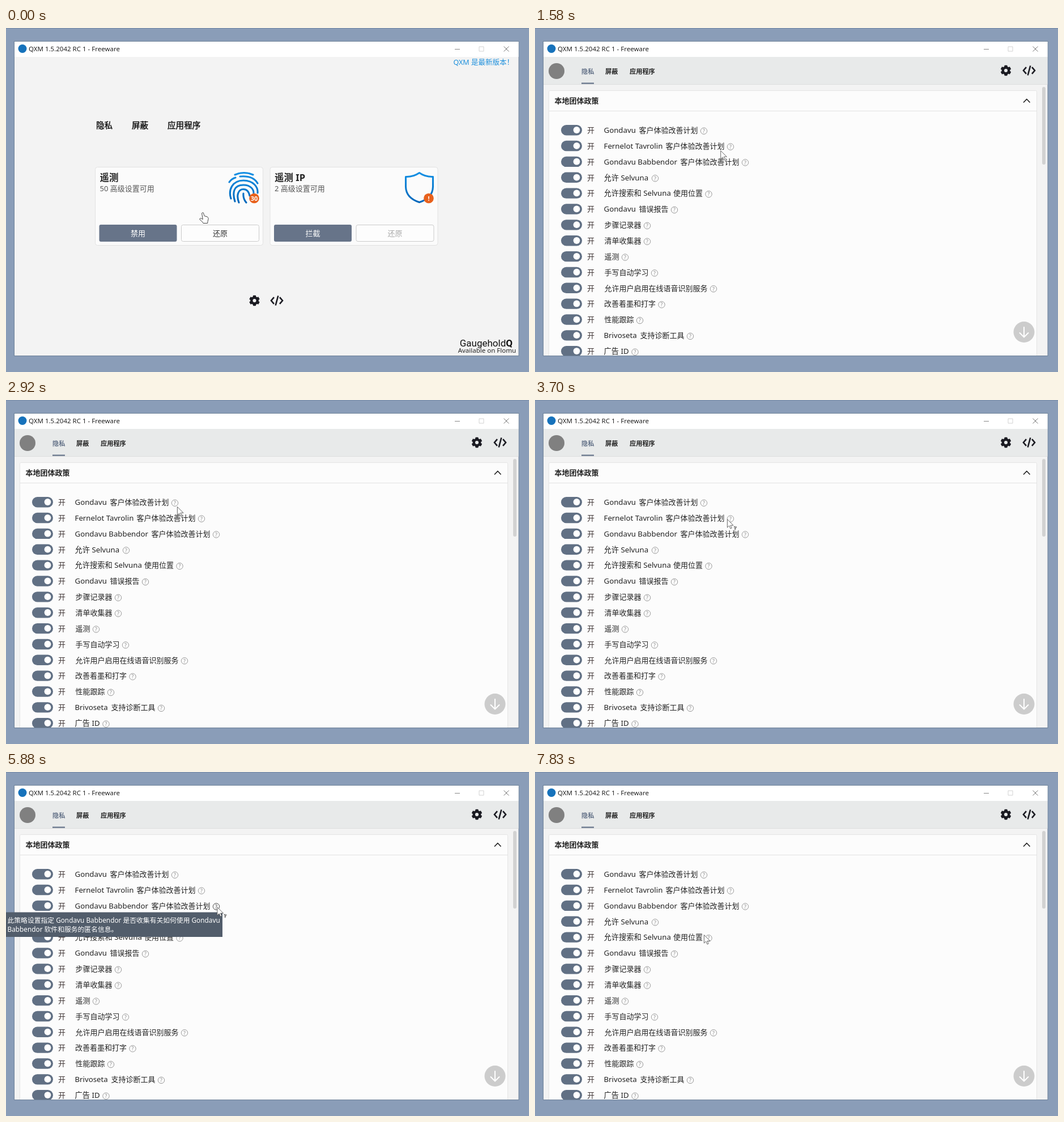
Recreate the animation shown at these times as an HTML page. Size 923 px wide and 607 px high, loop 7990 ms.

```html
<!DOCTYPE html>
<html lang="zh-CN">
<head>
<meta charset="utf-8">
<title>Privacy settings</title>
<style>
  html, body { margin: 0; width: 100%; height: 100%; overflow: hidden; background: #8a9db8; }
  svg { display: block; width: 100%; height: 100%; }
  text { font-family: 'Noto Sans', 'Noto Sans CJK SC', sans-serif; fill: #222; white-space: pre; }
  .mid { text-anchor: middle; }
  .end { text-anchor: end; }
  .bold { font-weight: 700; }
  .light { font-weight: 300; }
  .semi { stroke: #111; stroke-width: .4; }
  .brand { font-family: Roboto, sans-serif; }
  .line { fill: none; stroke-linecap: round; stroke-linejoin: round; }
  .help { stroke: #999; fill: none; }
  .help text { fill: #888; stroke: none; font-size: 9px; }
  .help.hover { stroke: #444; }
  .help.hover text { fill: #333; }
  .tip rect { fill: #525d6b; }
  .tip text { fill: #fff; }
</style>
</head>
<body>
<svg viewBox="0 0 923 607">
  <defs>
    <clipPath id="inside"><path d="M15 24H904.5V578H15Z"/></clipPath>
    <linearGradient id="blue" x2="0" y2="1">
      <stop stop-color="#1590e4"/><stop offset="1" stop-color="#0067bb"/>
    </linearGradient>
    <g id="gear">
      <circle r="5.2" fill="none" stroke="#1b1b22" stroke-width="4.4"/>
      <g id="teeth" fill="#1b1b22"></g>
    </g>
    <path id="code" fill="none" stroke="#1b1b22" stroke-width="2.6" d="M-5 -5.800L-10 0L-5 5.800M5 -5.800L10 0L5 5.800M2.300 -8.500L-2.300 8.500"/>
    <path id="arrowShape" fill="#fff" stroke="#555" stroke-width=".9" d="M.4 .5V15L3.7 11.8 6 17 8.2 16 6 11.2H11Z"/>
    <g id="arrow"><use href="#arrowShape"/></g>
    <g id="helper">
      <use href="#arrowShape"/>
      <text x="14.5" y="18.500" class="mid bold" font-size="9.500" style="fill:#fff;stroke:#555;stroke-width:.7">?</text>
    </g>
    <path id="hand" fill="#fff" stroke="#444" stroke-linejoin="round"
      d="M4.6 2Q5.6 -.3 7.4 1.2L9 6.6L14 8Q16 9 16.2 11.5L15 16.5L14.6 19.5H7L6 17.5L1 13Q.5 10.6 2.6 10.6L6.3 12.6Z"/>
  </defs>

  <rect width="923" height="607" fill="#8a9db8"/>
  <rect width="923" height="1" fill="#7489a5"/>
  <rect x="14.5" y="23.5" width="890.5" height="555" fill="#f3f3f3" stroke="#6d8198"/>
  <rect x="15" y="24" width="889.5" height="27" fill="#fff"/>
  <circle cx="29" cy="36.5" r="7.5" fill="#1672bb"/>
  <text x="40" y="41" font-size="11.5">QXM 1.5.2042 RC 1 - Freeware</text>
  <path d="M792 37.5H801" stroke="#888"/>
  <path d="M835 33H843V41H835Z" fill="none" stroke="#d2d2d2"/>
  <path d="M878.5 32.5L887.5 41.5M887.5 32.5L878.5 41.5" stroke="#777"/>

  <g id="home"></g>
  <g id="list" clip-path="url(#inside)"></g>
  <g id="overlay">
    <circle id="click" cx="297" cy="186.5" r="10.5" fill="#fbe72a" style="mix-blend-mode:multiply"/>
  </g>
  <use id="cursor"/>
</svg>
<script>
const LOOP = 7990;
const $ = id => document.getElementById(id);
const text = (x, y, size, str, cls = '', fill = '') =>
  `<text x="${x}" y="${y}" font-size="${size}" class="${cls}"${fill && ` style="fill:${fill}"`}>${str}</text>`;
const box = (x, y, w, h, r, fill, stroke = 'none') =>
  `<rect x="${x}" y="${y}" width="${w}" height="${h}" rx="${r}" fill="${fill}" stroke="${stroke}"/>`;
const place = (id, x, y) => `<use href="#${id}" x="${x}" y="${y}"/>`;

$('teeth').innerHTML = [0, 60, 120, 180, 240, 300]
  .map(a => `<rect x="-2.6" y="-9.3" width="5.2" height="4" rx=".8" transform="rotate(${a})"/>`).join('');

// Start page
const card = (x, title, note, action, restoreColor, icon, badge, badgeX) =>
  box(x + .5, 245.5, 296, 138, 4, '#fbfbfb', '#e2e2e2') +
  text(x + 8.5, 270, 16.5, title, 'bold') +
  text(x + 8.5, 288, 13, note, 'light', '#555') +
  box(x + 7.5, 347, 137, 30, 3, '#677489') +
  text(x + 76, 367, 13, action, 'mid', '#fff') +
  box(x + 152.5, 347.5, 137, 29, 3, '#fdfdfd', '#cbcbcb') +
  text(x + 221, 367, 13, '还原', 'mid', restoreColor) +
  `<path class="line" stroke="url(#blue)" stroke-width="3.1" d="${icon}"/>` +
  `<circle cx="${badgeX}" cy="300.5" r="8.8" fill="#e8611c"/>` +
  text(badgeX, 304.5, 11, badge, 'mid bold', '#fff');

const fingerprint = 'M404 259Q420 252 436 259M394 272Q398 266 405 264M413 262Q436 260 444 274' +
  'M397 301C392 286 399 269 419 269C437 269 445 281 444 291' +
  'M404 306C399 290 402 277 419 277C432 277 437 285 437 291' +
  'M411 308C406 295 410 284.5 419 284.5C427 284.5 429 291 430 296M419 292Q418 301 424 308';
const shield = 'M729.5 255.5Q740 263 753.5 262.5V280Q753 300 729.5 307.5' +
  'Q706 300 705.5 280V262.5Q719 263 729.5 255.5Z';

$('home').innerHTML =
  text(789.5, 65, 12.5, 'QXM 是最新版本！', 'light', '#1c8fdc') +
  [[159, '隐私'], [222, '屏蔽'], [285, '应用程序']]
    .map(([x, s]) => text(x, 177, 14.6, s, 'semi', '#111')).join('') +
  card(157, '遥测', '50 高级设置可用', '禁用', '#333', fingerprint, '30', 438) +
  card(465.5, '遥测 IP', '2 高级设置可用', '拦截', '#aaa', shield, '!', 746) +
  place('gear', 438.5, 481) + place('code', 478, 481) +
  text(894, 562, 17, 'Gaugehold<tspan class="bold">Q</tspan>', 'end brand', '#111') +
  text(900, 573, 11.5, 'Available on Flomu', 'end');

// Policy list: head, tail, centre of the help mark
const rows = [
  ['Gondavu', '客户体验改善计划', 298], ['Fernelot Tavrolin', '客户体验改善计划', 345],
  ['Gondavu Babbendor', '客户体验改善计划', 371], ['允许 Selvuna', '', 212],
  ['允许搜索和 Selvuna', '使用位置', 306.5], ['Gondavu', '错误报告', 246],
  ['', '步骤记录器', 198], ['', '清单收集器', 198], ['', '遥测', 159], ['', '手写自动学习', 211],
  ['', '允许用户启用在线语音识别服务', 315], ['', '改善着墨和打字', 223.5],
  ['', '性能跟踪', 185], ['Brivoseta', '支持诊断工具', 274], ['广告 ID', '', 176.5]
];
const row = ([head, tail, markX], i) => {
  const y = 180 + i * 27.86;
  return box(46, y - 9, 37, 18.4, 9.2, '#617084') +
    `<circle cx="73.5" cy="${y}" r="5.9" fill="#fff"/>` +
    text(92, y + 5, 13, '开', 'light', '#3c3232') +
    text(121.5, y + 5, 13.25, head) + text(markX - 10.5, y + 5, 13, tail, 'end light') +
    `<g class="help"><circle cx="${markX}" cy="${y + 1.7}" r="5.7"/>${text(markX, y + 5, 9, '?', 'mid')}</g>`;
};

$('list').innerHTML =
  box(15, 51, 890, 48, 0, '#e8eaea') + box(15, 99, 890, 1, 0, '#dcdddd') +
  '<circle cx="38" cy="76" r="14" fill="#808080"/>' +
  text(82, 81, 11.2, '隐私', 'bold', '#66748a') +
  text(124, 81, 11.2, '屏蔽', 'bold') + text(167, 81, 11.2, '应用程序', 'bold') +
  '<rect id="underline" y="96.5" height="2.2" fill="#66748a"/>' +
  place('gear', 831, 75) + place('code', 872, 75) +
  box(24.5, 110.5, 861, 480, 2, '#fcfcfc', '#e4e4e4') + box(25, 146, 861, 1, 0, '#e2e2e2') +
  text(34.5, 133, 13, '本地团体政策', 'bold') +
  '<path class="line" stroke="#222" stroke-width="1.7" d="M862.5 131L867.8 125.5L873 131"/>' +
  box(895, 104, 6, 137, 3, '#d2d2d2') +
  rows.map(row).join('') +
  '<circle cx="863" cy="536.5" r="18.5" fill="#ccc"/>' +
  '<path class="line" stroke="#fff" stroke-width="2" d="M863 528V545M855.5 538L863 545.5L870.5 538"/>';

const marks = [...document.querySelectorAll('.help')];

// Tooltips: the bar opens at `open`, unfolds at `full`
const tips = [
  { hover: 1860, open: 2270, full: 2390, close: 2920, x: 0, y: 198, w: 308, bar: 10,
    lines: ['此策略设置可关闭 Gondavu 客户体验改善计划。', '该计划收集有关硬件配置以及如何使用软件和服务的信', '息，以识别趋势和使用模式。'] },
  { hover: 3860, open: 3990, full: 4120, close: 4770, x: 163, y: 222, w: 190, bar: 8,
    lines: ['此策略设置可阻止用户参与该计划'] },
  { hover: 5310, open: 5720, full: 5880, close: 7180, x: 0, y: 247.5, w: 382, bar: 6,
    lines: ['此策略设置指定 Gondavu Babbendor 是否收集有关如何使用 Gondavu', 'Babbendor 软件和服务的匿名信息。'] }
];
$('overlay').insertAdjacentHTML('beforeend', tips.map(t =>
  `<g class="tip"><rect x="${t.x}" y="${t.y}" width="${t.w}"/><g>` +
  t.lines.map((s, i) => text(t.x + 2.5, t.y + 18.5 + i * 16, 11.8, s)).join('') + '</g></g>').join(''));
const tipNodes = [...document.querySelectorAll('.tip')];

// Cursor moves: start, end, poses, shape, from, to
const moves = [
  [0, 0, 1, 'hand', [341, 325]],
  [120, 120, 1, 'hand', [345, 293]],
  [280, 280, 1, 'hand', [347, 278]],
  [810, 1180, 4, 'arrow', [358.5, 284], [400, 294]],
  [1340, 1700, 4, 'arrow', [386, 270], [298, 189]],
  [1860, 1860, 1, 'helper', [298, 188.5]],
  [2110, 2110, 1, 'helper', [297, 187]],
  [2920, 3170, 3, 'arrow', [302, 188], [320, 191]],
  [3700, 3700, 1, 'helper', [339, 210]],
  [3860, 4120, 3, 'helper', [341, 211], [343, 212]],
  [4770, 4770, 1, 'arrow', [352, 222]],
  [4930, 5060, 2, 'arrow', [358, 227], [365, 233]],
  [5190, 5310, 2, 'helper', [371, 238], [375, 240]],
  [5470, 5470, 1, 'helper', [372.5, 238]],
  [7180, 7310, 2, 'arrow', [393, 247], [412, 255]],
  [7460, 7830, 4, 'arrow', [390, 262], [298, 287]]
];

function poseAt(t) {
  const [start, end, poses, shape, from, to = from] = moves.findLast(m => m[0] <= t);
  const gaps = poses - 1;
  const p = gaps ? Math.min(gaps, Math.floor((t - start) / (end - start) * gaps + .02)) / gaps : 0;
  return [shape, from[0] + (to[0] - from[0]) * p, from[1] + (to[1] - from[1]) * p];
}

const show = (node, on) => { node.style.display = on ? '' : 'none'; };

function draw(t) {
  show($('home'), t < 810);
  show($('list'), t >= 810);
  show($('click'), t >= 2270 && t < 2390);

  const width = t < 930 ? 0 : t < 1055 ? 12 : 22;
  $('underline').setAttribute('x', 93 - width / 2);
  $('underline').setAttribute('width', width);

  tips.forEach((tip, i) => {
    const [rect, lines] = tipNodes[i].children;
    marks[i].classList.toggle('hover', t >= tip.hover && t < tip.close);
    show(tipNodes[i], t >= tip.open && t < tip.close);
    show(lines, t >= tip.full);
    rect.setAttribute('height', t < tip.full ? tip.bar : tip.lines.length * 16 + 11.5);
  });

  const [shape, x, y] = poseAt(t);
  $('cursor').setAttribute('href', '#' + shape);
  $('cursor').setAttribute('transform', `translate(${x} ${y})`);
}

const began = performance.now();
function tick() {
  draw((performance.now() - began) % LOOP);
  requestAnimationFrame(tick);
}
tick();
</script>
</body>
</html>
```
